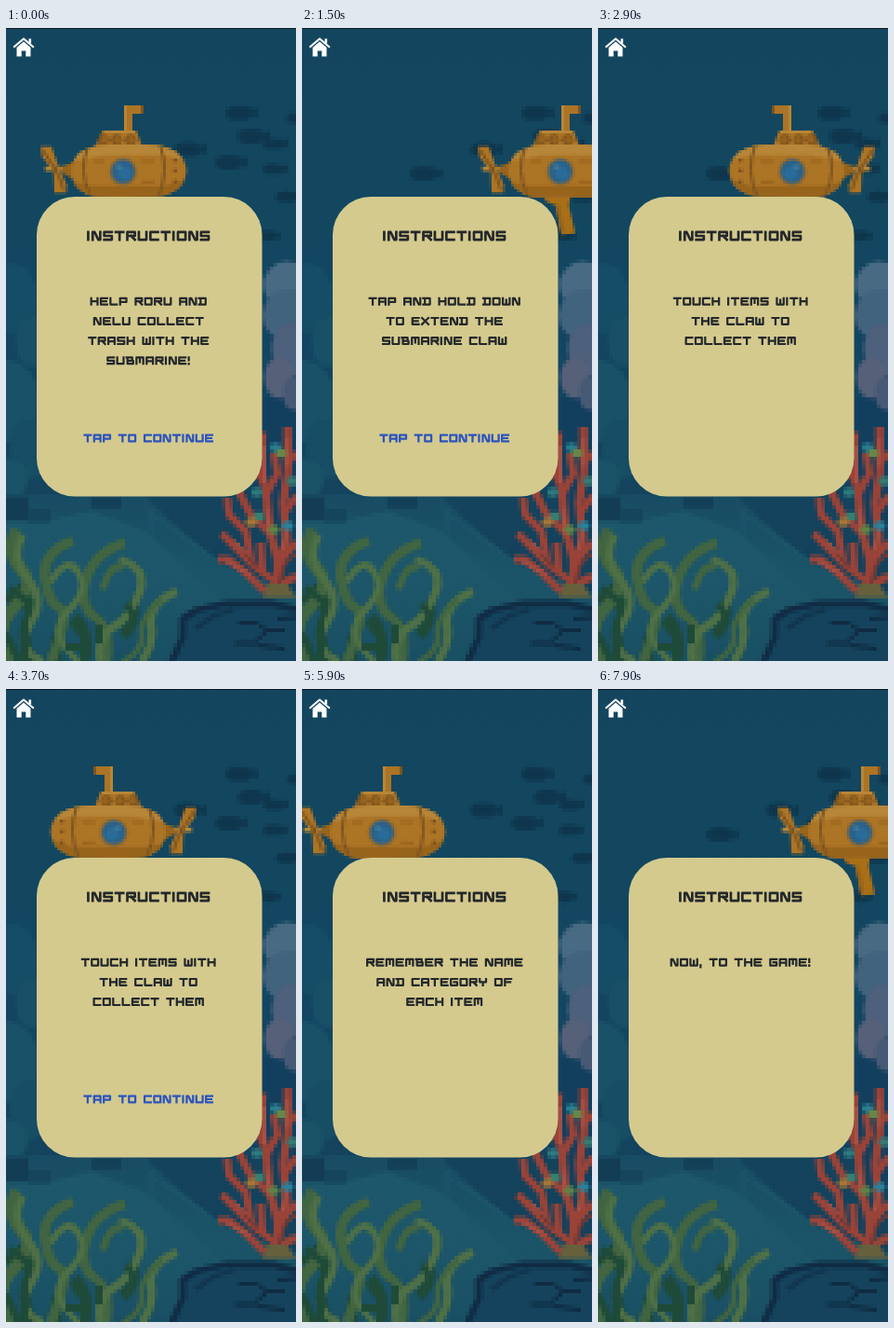
Recreate the animation shown at these times as an HTML page with a canvas. Size 312x679 px, loop 8 s.

```html
<!DOCTYPE html>
<html lang="en">
<head>
<meta charset="utf-8">
<title>Submarine instructions</title>
<style>
  html, body { margin: 0; width: 100%; height: 100%; overflow: hidden; background: #13445f; }
  canvas { display: block; width: 100%; height: 100%; }
  /* Selectable copy of the stroke lettering */
  #words { position: absolute; left: 33px; top: 181px; width: 243px; text-align: center; color: transparent;
    font: 12px/21px "DejaVu Sans Mono", monospace; white-space: pre-line; padding-top: 31px; box-sizing: border-box; }
</style>
</head>
<body>
<canvas id="stage" width="312" height="679"></canvas>
<div id="words"></div>
<script>
const LOOP = 8000, TAP_DELAY = 800, MID = 153.3;
const PAGES = [
  { from: -2000, lines: ["HELP RORU AND", "NELU COLLECT", "TRASH WITH THE", "SUBMARINE!"] },
  { from: 200, lines: ["TAP AND HOLD DOWN", "TO EXTEND THE", "SUBMARINE CLAW"] },
  { from: 2700, lines: ["TOUCH ITEMS WITH", "THE CLAW TO", "COLLECT THEM"] },
  { from: 5200, lines: ["REMEMBER THE NAME", "AND CATEGORY OF", "EACH ITEM"] },
  { from: 7600, lines: ["NOW, TO THE GAME!"] }
];

// Letter strokes on a 4 x 4 grid
const GLYPHS = {
  A: "M0 4V0H4V4M0 2.3H4", B: "M-.2 0H3.4V2M.4 0V4H4V2H.4", C: "M4 0H0V4H4",
  D: "M-.2 0H4V4H-.2M.8 0V4", E: "M4 0H0V4H4M0 2H3.4", F: "M4 0H0V4M0 2H3.4",
  G: "M4 0H0V4H4V2H2", H: "M0 0V4M4 0V4M0 2H4", I: "M0 0V4", L: "M0 0V4H4",
  M: "M0 4V0H4.3V4M2.15 0V3", N: "M0 4V0H1L3 4H4V0", O: "M0 0H4V4H0Z",
  P: "M0 4V0H4V2.4H0", R: "M0 4V0H4V2H0M2 2L4 4", S: "M4 0H0V2H4V4H0",
  T: "M0 0H4M2 0V4", U: "M0 0V4H4V0", W: "M0 0V4H4.3V0M2.15 1V4",
  X: "M0 0L4 4M4 0L0 4", Y: "M0 0V2H4V0M2 2V4", ",": "M0 3.8V5", "!": "M0 0V1.8M0 3.9V4.1"
};
for (const k in GLYPHS) GLYPHS[k] = new Path2D(GLYPHS[k]);

const stage = document.getElementById("stage").getContext("2d");
const words = document.getElementById("words");

function advance(ch) {
  if (ch === " ") return 6.4;
  if ("I,!".includes(ch)) return 4;
  return "MW".includes(ch) ? 10.9 : 10.35;
}

function lettering(text, y, color, size = 1) {
  const width = [...text].reduce((sum, ch) => sum + advance(ch), -1.4) * size;
  let x = MID - width / 2 + size;
  stage.strokeStyle = color;
  stage.lineWidth = 1.32;
  stage.lineCap = "square";
  for (const ch of text) {
    if (GLYPHS[ch]) {
      stage.save();
      stage.translate(x, y - 3.4 * size);
      stage.scale(1.7 * size, 1.7 * size);
      stage.stroke(GLYPHS[ch]);
      stage.restore();
    }
    x += advance(ch) * size;
  }
}

// Paints stage coordinates into a coarse grid
function coarse(x, y, w, h, cell, paint) {
  const cv = document.createElement("canvas");
  cv.width = Math.ceil(w / cell);
  cv.height = Math.ceil(h / cell);
  const c = cv.getContext("2d");
  c.scale(1 / cell, 1 / cell);
  c.translate(-x, -y);
  paint(brush(c));
  return { cv, y, w: cv.width * cell, h: cv.height * cell };
}

function brush(c) {
  return {
    c,
    rect(x, y, w, h, color) { c.fillStyle = color; c.fillRect(x, y, w, h); },
    oval(x, y, rx, ry, color) {
      c.fillStyle = color;
      c.beginPath();
      c.ellipse(x, y, rx, ry, 0, 0, 7);
      c.fill();
    },
    shape(d, color) { c.fillStyle = color; c.fill(new Path2D(d)); },
    line(d, color, width) {
      c.strokeStyle = color;
      c.lineWidth = width;
      c.lineJoin = "round";
      c.stroke(new Path2D(d));
    }
  };
}

function fade(b, y0, y1, ...colors) {
  const g = b.c.createLinearGradient(0, y0, 0, y1);
  colors.forEach((color, i) => g.addColorStop(i / (colors.length - 1), color));
  return g;
}

function fish(b, x, y, s = 1) {
  b.oval(x, y, 15 * s, 8 * s, "#0f3850");
  b.shape(`M${x + 8 * s} ${y}l${12 * s} ${-6 * s}v${12 * s}z`, "#0f3850");
  b.rect(x - 10 * s, y - 2, 18 * s, 4, "#0e344a");
}

function sea(b) {
  b.rect(0, 0, 312, 680, fade(b, 0, 679, "#14455f", "#13475f", "#134562", "#14435d", "#133f5a"));
  b.rect(276, 396, 36, 130, "#133f5e");

  // Distant reef
  b.oval(8, 290, 26, 38, "#164d66");
  b.oval(28, 336, 18, 28, "#184f67");
  b.oval(2, 400, 34, 44, "#195168");
  b.oval(26, 452, 22, 32, "#174d65");
  b.oval(4, 484, 20, 22, "#1a5268");
  b.oval(302, 276, 25, 26, "#486a83");
  b.oval(306, 308, 30, 28, "#42637d");
  b.oval(306, 345, 20, 28, "#4d607c");
  b.oval(294, 375, 16, 22, "#566079");
  b.oval(312, 392, 14, 18, "#465a75");

  seabed(b);
  [[251, 91], [264, 116], [196, 130], [131, 156], [240, 144], [288, 124, .8],
   [288, 151, .8], [302, 181, .8], [312, 97, .7], [282, 223, .7]].forEach(f => fish(b, ...f));
  rock(b);
  coral(b);
  weeds(b);
}

function seabed(b) {
  b.shape("M0 500H148L174 526L230 574L312 606V680H0Z", fade(b, 500, 679, "#184c64", "#1b5468", "#194f63"));
  b.shape("M0 530H40L92 518L150 540L196 580L230 610L180 680H0Z", fade(b, 518, 679, "#1d576b", "#1d566a", "#194f62"));
  b.rect(0, 503, 24, 25, "#133d55");
  b.rect(24, 516, 24, 14, "#15455d");
  b.rect(92, 503, 32, 12, "#133f57");
  b.line("M156 516V540M160 524L228 572", "#1d566c", 4);
}

function rock(b) {
  b.shape("M176 680L190 652L190 632L206 622L240 616L290 614L312 622V680Z", "#15435d");
  b.line("M178 680L190 654V634L206 624L238 617H284L312 624", "#102c44", 7);
  b.line("M204 644L224 630L244 624", "#12344d", 5);
  b.line("M250 638H270L280 646H300M280 648L266 660H246M292 634L312 632M270 662L300 666", "#0f2b42", 4);
}

function coral(b) {
  const red = "#9a4338";
  b.line("M292 606V570L284 540L280 500L274 470L276 434M292 590L302 548L298 510L303 476V428", red, 9);
  b.line("M290 594L268 578L246 556L232 542M228 570H240L258 584L276 602L290 604M264 574L258 540L240 522L238 504M282 540L262 520L252 500V480", red, 8);
  b.line("M280 500L292 478L288 456M276 486L264 466V452M300 520L312 502M303 466L312 456M296 570L312 552M290 600L312 588M276 584L274 552", red, 8);
  b.line("M278 488V448M284 546L280 514M303 470V440M260 566L246 550M298 560L302 534M236 572L262 586", "#b05547", 3);
  b.line("M292 602L300 574L312 564M270 580L256 562", "#763834", 4);
  b.shape("M276 611L282 596H302L312 611Z", "#66613c");
  [[290, 450, "#2b7f91"], [296, 456, "#668647"], [272, 524, "#347f71"], [264, 530, "#a97636"],
   [303, 534, "#27829b"], [288, 538, "#5e8346"], [308, 486, "#347b72"], [270, 498, "#2f7a80"]]
    .forEach(([x, y, color]) => b.oval(x, y, 6, 5, color));
}

function weeds(b) {
  const green = "#426541", light = "#4f7046", dark = "#1f4a38";
  b.line("M30 680Q14 656 24 632T12 600M84 680Q92 650 74 632M56 680Q48 660 60 646M126 652Q142 636 136 614M0 612Q16 610 24 622", dark, 11);
  b.line("M12 538Q-2 562 16 580T8 622T6 680", green, 13);
  b.line("M18 544Q4 570 24 592T26 640T40 680", light, 8);
  b.line("M72 550Q38 562 42 590T58 622T48 680", green, 11);
  b.line("M128 552Q94 562 86 592T96 632T108 680", green, 10);
  b.line("M48 594Q66 564 78 584T66 626T78 680", light, 7);
  b.line("M122 570Q152 578 144 604T116 642T102 680", light, 9);
  b.line("M104 602Q112 572 126 580", green, 8);
  b.line("M184 604Q152 618 156 640T146 680", light, 9);
  b.line("M168 612Q144 632 146 650T126 680", green, 6);
  b.line("M4 600L24 616M20 636V680M0 650L14 680M72 636L80 650M100 640V660M130 618L138 632M64 664H90", dark, 8);
}

function submarine(b) {
  const main = "#ac7425", light = "#b78638", dark = "#7d5420", shade = "#98641c";
  // Claw arm
  b.shape("M108 178H137L135 190L142 220L127 222L121 190L110 186Z", "#a96f17");
  b.line("M123 190L129 220", shade, 4);
  // Propeller
  b.shape("M37 127H49L57 150V154H51L39 138Z", main);
  b.shape("M51 150H57L65 168V177H52Z", main);
  b.line("M39 130L52 150M62 174L56 156", dark, 3);
  b.line("M42 151H74", light, 5);
  b.shape("M60 149L76 142V164L60 155Z", shade);
  b.rect(50, 148, 6, 8, dark);
  // Periscope and tower
  b.rect(127, 83, 21, 9, main);
  b.rect(127, 83, 9, 29, main);
  b.rect(127, 83, 3, 29, light);
  b.rect(145, 83, 3, 9, dark);
  b.shape("M104 110H140L148 130H95Z", main);
  b.rect(106, 110, 33, 3, light);
  for (const x of [105, 119, 134]) {
    b.oval(x, 120, 6, 6, dark);
    b.oval(x + 1, 120, 3.5, 4, shade);
  }
  // Hull
  const hull = new Path2D("M70 153C70 134 92 125 112 125H152C176 125 194 136 194 153S178 181 160 181H100C84 181 70 170 70 153Z");
  b.c.save();
  b.c.clip(hull);
  b.rect(66, 120, 132, 64, main);
  b.shape("M66 120H198V142L164 136H106L66 144Z", light);
  b.shape("M66 164L92 169H172L198 160V184H66Z", shade);
  b.line("M88 128Q78 153 90 178M166 126Q176 153 164 181", dark, 3);
  b.c.restore();
  for (const y of [142, 153, 165]) b.rect(180, y - 2, 4, 4, dark);
  b.line("M146 143H160M146 165H160M94 143H106", shade, 3);
  // Window
  b.oval(126, 154, 15, 15, "#85683a");
  b.oval(126, 154, 12.5, 12.5, "#2a628a");
  b.oval(128, 156, 7, 7, "#2a6c99");
  b.rect(119, 147, 6, 5, "#3d7897");
}

const backdrop = coarse(0, 0, 312, 680, 4, sea);
const sub = coarse(34, 80, 162, 144, 3, submarine);

function drawSub(t) {
  const phase = t / 1000 - .33;
  stage.save();
  stage.translate(154.7 + 121.5 * Math.sin(phase), 0);
  if (Math.cos(phase) < 0) stage.scale(-1, 1);
  stage.drawImage(sub.cv, -sub.w / 2, sub.y, sub.w, sub.h);
  stage.restore();
}

function drawHome() {
  const b = brush(stage);
  b.line("M9 20L19 11.5L29 20", "#fff", 2.1);
  b.shape("M11.5 21L19 14.5L26.5 21V30.5H21.3V24.5H16.7V30.5H11.5Z", "#fff");
  b.rect(24.5, 11.5, 2.6, 5, "#fff");
}

function drawPanel() {
  stage.beginPath();
  stage.roundRect(33, 181, 242.5, 321.5, 41);
  stage.fillStyle = "#d4ca8e";
  stage.fill();
}

function drawText(t) {
  const page = PAGES.filter(p => p.from <= t).pop();
  const ready = t >= page.from + TAP_DELAY;
  lettering("INSTRUCTIONS", 223, "#25282b", 1.2);
  page.lines.forEach((line, i) => lettering(line, 293.2 + i * 21.2, "#25282b"));
  if (ready) lettering("TAP TO CONTINUE", 440, "#2c54bd");
  const copy = ["INSTRUCTIONS", "", "", ...page.lines, ready ? "\n\nTAP TO CONTINUE" : ""].join("\n");
  if (words.textContent !== copy) words.textContent = copy;
}

function frame() {
  const t = performance.now() % LOOP;
  stage.imageSmoothingEnabled = false;
  stage.drawImage(backdrop.cv, 0, 0, backdrop.w, backdrop.h);
  brush(stage).rect(0, 0, 312, 1, "#0d1a22");
  drawSub(t);
  drawPanel();
  drawHome();
  drawText(t);
  requestAnimationFrame(frame);
}
frame();
</script>
</body>
</html>
```
